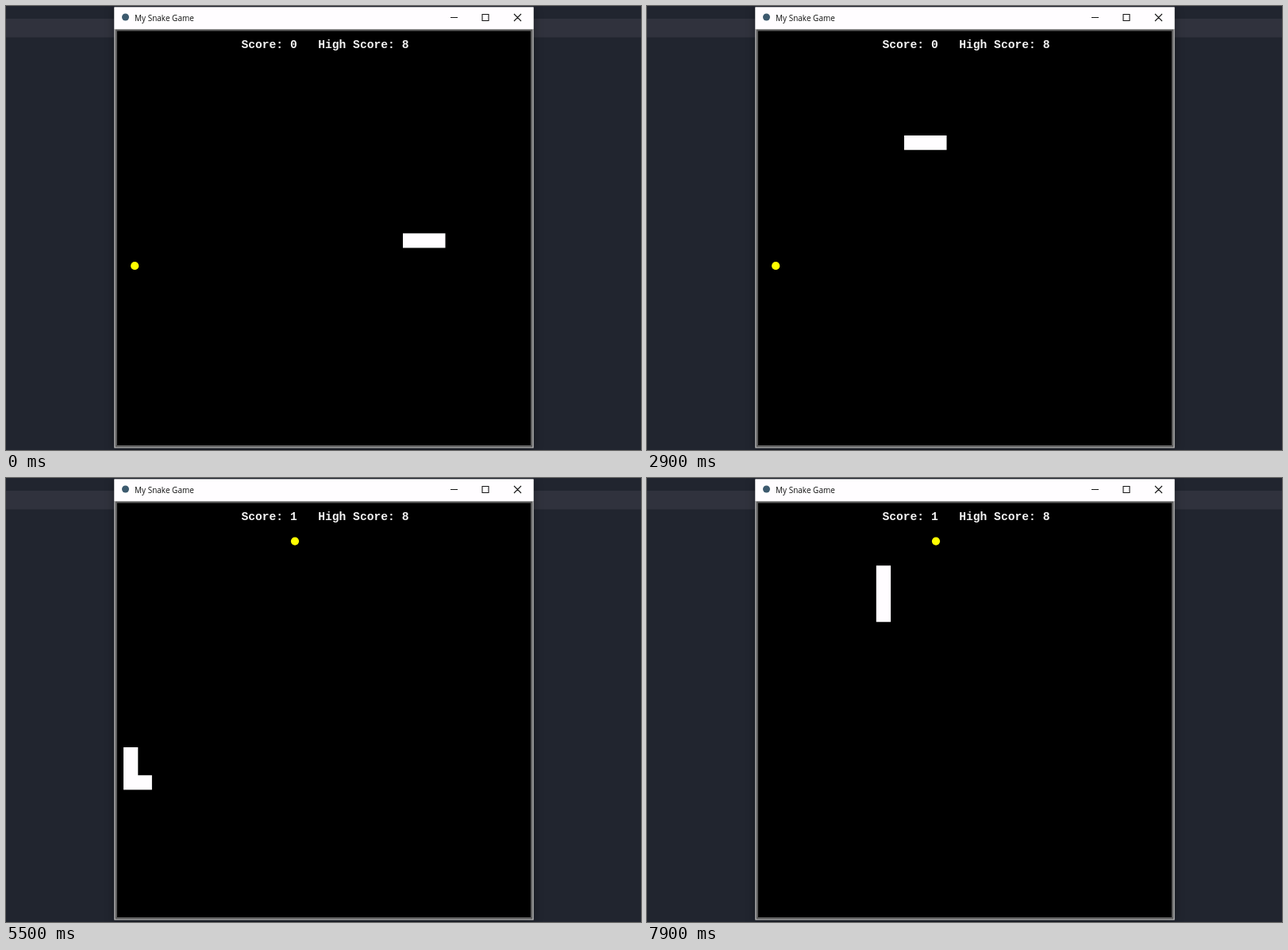
An HTML page that plays this animation: 800 by 559 pixels, repeating every 8000 ms.

```html
<!DOCTYPE html>
<html lang="en">
<head>
<meta charset="utf-8">
<title>My Snake Game</title>
<style>
  html, body { margin: 0; width: 100%; height: 100%; overflow: hidden; background: #21252f; }
  svg { display: block; width: 100%; height: 100%; }
  .window { fill: #c6c6c6; filter: drop-shadow(0 2px 6px rgba(0, 0, 0, .35)); }
  .title { font: 10px "Open Sans", "Noto Sans", sans-serif; fill: #111; }
  .score { font: bold 14.67px "Liberation Mono", monospace; fill: #f4f4f4; white-space: pre; }
</style>
</head>
<body>
<svg viewBox="0 0 800 559">
  <rect width="800" height="559" fill="#21252f"/>
  <rect y="16" width="800" height="23.5" fill="#30323d"/>
  <rect class="window" x="136.3" y="1.5" width="528.4" height="555"/>
  <rect x="136.5" y="1.5" width="528" height="27.5" fill="#fffdff"/>
  <circle cx="150.5" cy="14" r="4.5" fill="#3d5a6e"/>
  <text class="title" x="162" y="18.6">My Snake Game</text>
  <path d="M560 14.5h9M600 10.5h8v8h-8zM640 10l9 9M649 10l-9 9" fill="none" stroke="#151515" stroke-width="1.1"/>
  <rect x="137.5" y="29.5" width="526" height="526" fill="#5c5c5c"/>
  <rect x="140" y="31.5" width="521" height="521.5" fill="#000"/>
  <text class="score" id="score" x="296.4" y="53"></text>
  <circle id="food" r="5.1" fill="#ff0"/>
  <path id="snake" fill="#fffdff"/>
</svg>
<script>
const LOOP = 8000, TICK = 100;
const CELL = 17.6, SIZE = 18.3, LEFT = 148, TOP = 163;
const EAT_STEP = 46;
const STALLS = [6, 18, 30, 42, 54, 64, 66, 75];   // ticks on which the snake stands still
const CATCH_UP = 65;                              // tick with a double step
const DIRS = { R: [1, 0], L: [-1, 0], U: [0, -1], D: [0, 1] };
const $ = id => document.getElementById(id);

// Cells visited by the head, starting with the initial body
const trail = [[20, 7]];
for (const [, dir, count] of "R6U7L26D12R8U15".matchAll(/([RLUD])(\d+)/g)) {
  for (let i = 0; i < count; i++) {
    const [x, y] = trail.at(-1), [dx, dy] = DIRS[dir];
    trail.push([x + dx, y + dy]);
  }
}

function draw(now) {
  const tick = Math.floor((now % LOOP) / TICK);
  const step = tick - STALLS.filter(s => s <= tick).length + (tick >= CATCH_UP);
  const eaten = step >= EAT_STEP;
  const head = step + 2, length = step > EAT_STEP ? 4 : 3;

  $("snake").setAttribute("d", trail.slice(head - length + 1, head + 1).map(([x, y]) =>
    `M${LEFT + x * CELL} ${TOP + y * CELL}h${SIZE}v${SIZE}h${-SIZE}z`).join(""));
  $("food").setAttribute("cx", eaten ? 364 : 162.2);
  $("food").setAttribute("cy", eaten ? 79.6 : 327.2);
  $("score").textContent = `Score: ${+eaten}   High Score: 8`;
  requestAnimationFrame(draw);
}
draw(performance.now());
</script>
</body>
</html>
```
